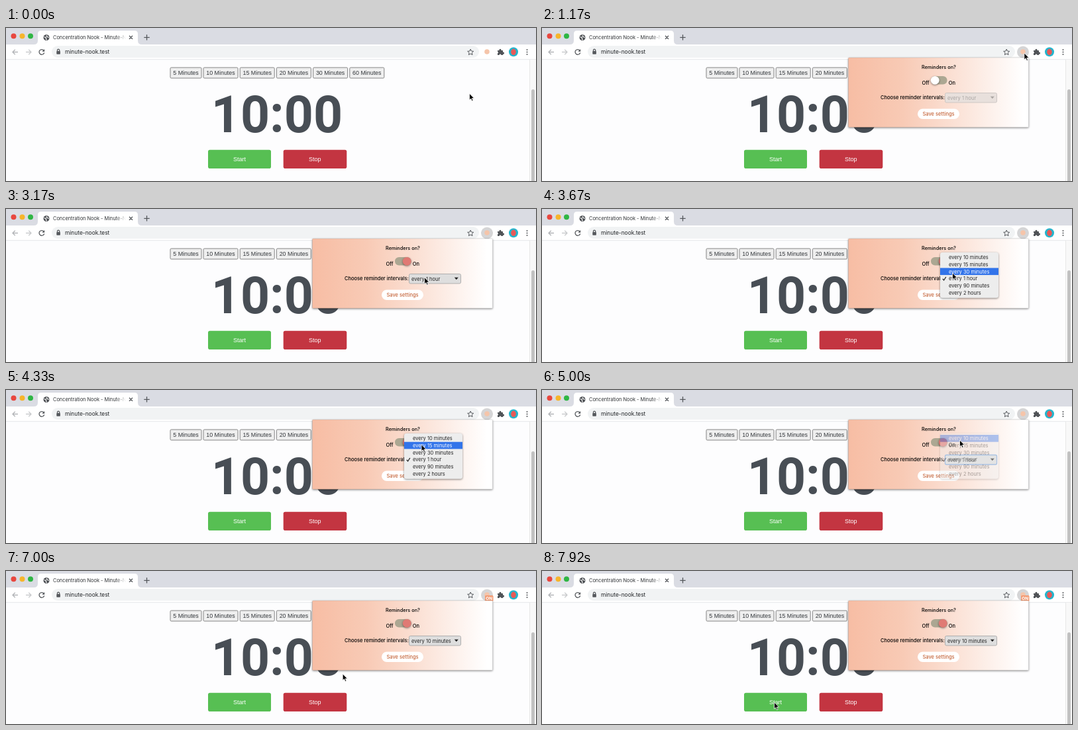
Recreate the animation shown at these times as an HTML page. Size 800 px wide and 232 px high, loop 8 s.

```html
<!DOCTYPE html>
<html lang="en">
<head>
<meta charset="utf-8">
<title>Reminder settings</title>
<style>
  html, body { margin: 0; width: 100%; height: 100%; overflow: hidden; background: #fdfdfe; }
  svg { display: block; font: 7.5px Inter, Roboto, sans-serif; }
  .page { font-family: "Liberation Sans", Arial, sans-serif; }
  .mid { text-anchor: middle; }
  .line { fill: none; stroke: #55585c; stroke-width: 1.3; }
  .shadow { filter: drop-shadow(0 1px 1.5px #0007); }
  #popup { font-weight: 500; }
</style>
</head>
<body>
<svg width="800" height="232" viewBox="0 0 800 232">
  <defs>
    <linearGradient id="peach">
      <stop offset="0" stop-color="#f7bda4"/>
      <stop offset=".3" stop-color="#f8cab5"/>
      <stop offset=".97" stop-color="#fff"/>
    </linearGradient>
    <linearGradient id="titleFade" gradientUnits="userSpaceOnUse" x1="166" x2="181">
      <stop stop-color="#303336"/>
      <stop offset="1" stop-color="#303336" stop-opacity="0"/>
    </linearGradient>
  </defs>

  <!-- Tab strip -->
  <rect width="800" height="25" fill="#dadce3"/>
  <circle cx="11.5" cy="12.3" r="4" fill="#e8473f"/>
  <circle cx="24.5" cy="12.3" r="4" fill="#f6b52b"/>
  <circle cx="37" cy="12.3" r="4" fill="#2fb644"/>
  <path d="M42 25q6 0 6-6V9q0-5 5-5h141q5 0 5 5v10q0 6 6 6z" fill="#fff"/>
  <circle cx="61" cy="14.5" r="4.5" fill="#505357"/>
  <path d="M57.5 13.5l3 1.2v2.2l1 1.5M62 11l-1 1.5 1.8 1 1.7 1" fill="none" stroke="#fff" stroke-width="1.1"/>
  <text x="71" y="17.2" font-size="7.4" fill="url(#titleFade)">Concentration Nook - Minute-Noo</text>
  <path class="line" d="M186 11.8l5 5m0-5l-5 5M208.3 14.3h8.4m-4.2-4.2v8.4"/>

  <!-- Toolbar -->
  <rect y="25" width="800" height="23" fill="#fff"/>
  <path d="M0 47.7h800" stroke="#dfe0e3" stroke-width=".8"/>
  <rect x="69" y="27" width="645" height="18" rx="9" fill="#f1f3f4"/>
  <path class="line" d="M18 36.5h-8m3.8-3.8L10 36.5l3.8 3.8" style="stroke:#b3b5b8"/>
  <path class="line" d="M30 36.5h8m-3.8-3.8l3.8 3.8-3.8 3.8" style="stroke:#c9cbcd"/>
  <path class="line" d="M57 34a3.9 3.9 0 1 0 .7 3.5"/>
  <path d="M58.2 32v3.8h-3.8z" fill="#55585c"/>
  <rect x="76.3" y="35" width="5.6" height="4.8" rx=".7" fill="#55585c"/>
  <path class="line" d="M77.5 35v-1.2a1.6 1.6 0 0 1 3.2 0V35" stroke-width="1"/>
  <text x="89" y="39" font-size="8.4" fill="#202326">minute-nook.test</text>
  <path class="line" d="M701.2 32l1.3 3 3.2.3-2.4 2.2.7 3.2-2.8-1.7-2.8 1.7.7-3.2-2.4-2.2 3.2-.3z" style="stroke-width:1"/>
  <circle id="halo" cx="726" cy="36.5" r="9" fill="#d5d5d6"/>
  <circle cx="726" cy="36" r="3.8" fill="#f5c5aa"/>
  <g id="badge">
    <rect x="723" y="37" width="12.5" height="9" rx="1.5" fill="#f39a72"/>
    <text class="mid" x="729.2" y="44" font-size="6.4" font-weight="bold" fill="#fff">ON</text>
  </g>
  <path d="M742 34h2.5a1.6 1.6 0 1 1 3 0h2.5v2.7a1.5 1.5 0 1 1 0 2.8v1.5h-2.5a1.5 1.5 0 0 0-3 0H742v-2.5a1.5 1.5 0 0 0 0-2.8z" fill="#505357"/>
  <circle cx="766" cy="36.3" r="7" fill="#24b5cd"/>
  <ellipse cx="766" cy="36.3" rx="3.8" ry="4.8" fill="#e75a58"/>
  <g fill="#55585c">
    <circle cx="786.5" cy="33" r="1"/><circle cx="786.5" cy="36.5" r="1"/><circle cx="786.5" cy="40" r="1"/>
  </g>

  <!-- Page -->
  <rect x="790" y="48" width="10" height="184" fill="#f8f8f8"/>
  <path d="M790.5 48v184" stroke="#e8e8e8"/>
  <rect x="793" y="93" width="5" height="145" rx="2.5" fill="#c1c1c1"/>
  <g id="presets" class="page mid" font-size="8.9"></g>
  <text class="mid" x="409" y="157.6" font-family="Roboto, sans-serif" font-size="77" font-weight="bold" fill="#484e55">10:00</text>
  <g class="page mid" font-size="9">
    <rect x="305" y="184.7" width="95" height="28.3" rx="2.8" fill="#57bf53"/>
    <text x="352.5" y="202.2" fill="#fff">Start</text>
    <rect x="418.7" y="184.7" width="95.6" height="28.3" rx="2.8" fill="#c33541"/>
    <text x="466.3" y="202.2" fill="#fff">Stop</text>
  </g>

  <!-- Extension popup -->
  <g id="popup">
    <rect class="shadow" x="462.5" y="45" width="272" height="105.5" rx="1" fill="url(#peach)" stroke="#0002" stroke-width=".6"/>
    <text class="mid" x="599" y="61.6" font-size="7.3">Reminders on?</text>
    <text x="573.5" y="85.6">Off</text>
    <text x="613.7" y="85.6">On</text>
    <rect x="587" y="73" width="24.5" height="12.5" rx="6.2" fill="#aca792"/>
    <circle id="knob" class="shadow" cy="79.3" r="6.4"/>
    <text x="511" y="108.1">Choose reminder intervals:</text>
    <rect id="select" x="608.5" y="98.5" width="78" height="14.5" rx="2"/>
    <g id="selectInk">
      <text id="choice" x="612" y="108.5" font-weight="400"></text>
      <path d="M676.8 103.7h6l-3 3.6z"/>
    </g>
    <rect id="save" x="567" y="122.5" width="63" height="15.5" rx="7.7"/>
    <text id="saveText" class="mid" x="598.5" y="132.9">Save settings</text>
  </g>
  <g id="menu">
    <rect class="shadow" x="601" y="65.7" width="88" height="69" rx="3.5" fill="#ededed"/>
    <rect id="highlight" x="601" width="88" height="10.7" fill="#3274ea"/>
    <path class="line" d="M604.8 105.8l1.8 2.2 3.2-5" style="stroke:#222"/>
    <g id="options"></g>
  </g>
  <path id="cursor" d="M0 0v10l2.3-2.1 1.6 3.6 1.7-.7-1.6-3.5h3.2z" stroke="#fff" stroke-width=".8"/>
</svg>
<script>
const LOOP = 8000, ROW = 10.7, MENU_TOP = 68;
const POPUP = 1000, TOGGLE = 2450, MENU = 3330, PICK = 4910, SAVED = 6300;
const OPTIONS = ['10 minutes', '15 minutes', '30 minutes', '1 hour', '90 minutes', '2 hours'].map(s => 'every ' + s);

// Cursor stops: time, x, y
const PATH = [
  [0, 699.5, 99.3], [150, 699.5, 99.3], [850, 727.5, 38], [1350, 728, 38],
  [2100, 593, 76], [2700, 593, 76], [3200, 632, 104], [3400, 632, 104],
  [3670, 619.5, 97], [3900, 620, 96.5], [4600, 630.5, 76], [5150, 630.5, 76],
  [5900, 606.5, 129], [6600, 606.5, 129], [7550, 350.5, 199], [LOOP, 350.5, 199]
];

const $ = id => document.getElementById(id);
const clamp = (v, lo = 0, hi = 1) => Math.min(hi, Math.max(lo, v));
const ease = p => p * p * (3 - 2 * p);
const set = (id, attrs) => {
  for (const key in attrs) $(id).setAttribute(key, attrs[key]);
};
const show = (id, on) => set(id, { visibility: on ? 'visible' : 'hidden' });

$('presets').innerHTML = [5, 10, 15, 20, 30, 60].map((n, i) => {
  const x = i ? 298 + (i - 1) * 55.2 : 248, w = i ? 52 : 47;
  return `<rect x="${x}" y="60" width="${w}" height="16" rx="1.5" fill="#efefef" stroke="#777" stroke-width=".9"/>
    <text x="${x + w / 2}" y="71.2" fill="#33373b">${n} Minutes</text>`;
}).join('');
$('options').innerHTML = OPTIONS.map((s, i) => `<text x="614" y="${76.2 + ROW * i}">${s}</text>`).join('');

function cursorAt(t) {
  const i = PATH.findIndex(stop => stop[0] > t);
  const [t0, x0, y0] = PATH[i - 1], [t1, x1, y1] = PATH[i];
  const p = ease((t - t0) / (t1 - t0));
  return [x0 + (x1 - x0) * p, y0 + (y1 - y0) * p];
}

function draw(t) {
  const [x, y] = cursorAt(t);
  set('cursor', { transform: `translate(${x} ${y})` });
  show('popup', t >= POPUP);
  show('halo', t >= POPUP);
  show('badge', t >= SAVED);

  const on = ease(clamp((t - TOGGLE - 50) / 200));
  const mix = (a, b) => Math.round(a + (b - a) * on);
  set('knob', { cx: 593.2 + 12 * on, fill: `rgb(${mix(255, 224)},${mix(255, 122)},${mix(255, 116)})` });

  const enabled = t >= TOGGLE, focused = t >= MENU && t < 5600;
  set('select', {
    fill: enabled ? '#dedede' : '#e8e0dc',
    stroke: focused ? '#7fa6dc' : enabled ? '#a9a9a9' : '#c9c3c0',
    'stroke-width': focused ? 1.3 : 0.9
  });
  set('selectInk', { fill: enabled ? '#222' : '#aaa5a2' });
  $('choice').textContent = OPTIONS[t < PICK + 120 ? 3 : 0];

  const hover = x > 567 && x < 630 && y > 122.5 && y < 138;
  set('save', { fill: hover ? '#d8dde0' : '#fff' });
  set('saveText', { fill: hover ? '#000' : '#c5663c' });

  show('menu', t >= MENU && t < PICK + 160);
  set('menu', { opacity: 1 - clamp((t - PICK) / 150) });
  const row = clamp(Math.floor((y - MENU_TOP) / ROW), 0, 5);
  set('highlight', { y: MENU_TOP + ROW * row });
  [...$('options').children].forEach((el, i) => el.setAttribute('fill', i === row ? '#fff' : '#222'));
}

const start = performance.now();
function frame() {
  draw((performance.now() - start) % LOOP);
  requestAnimationFrame(frame);
}
frame();
</script>
</body>
</html>
```
